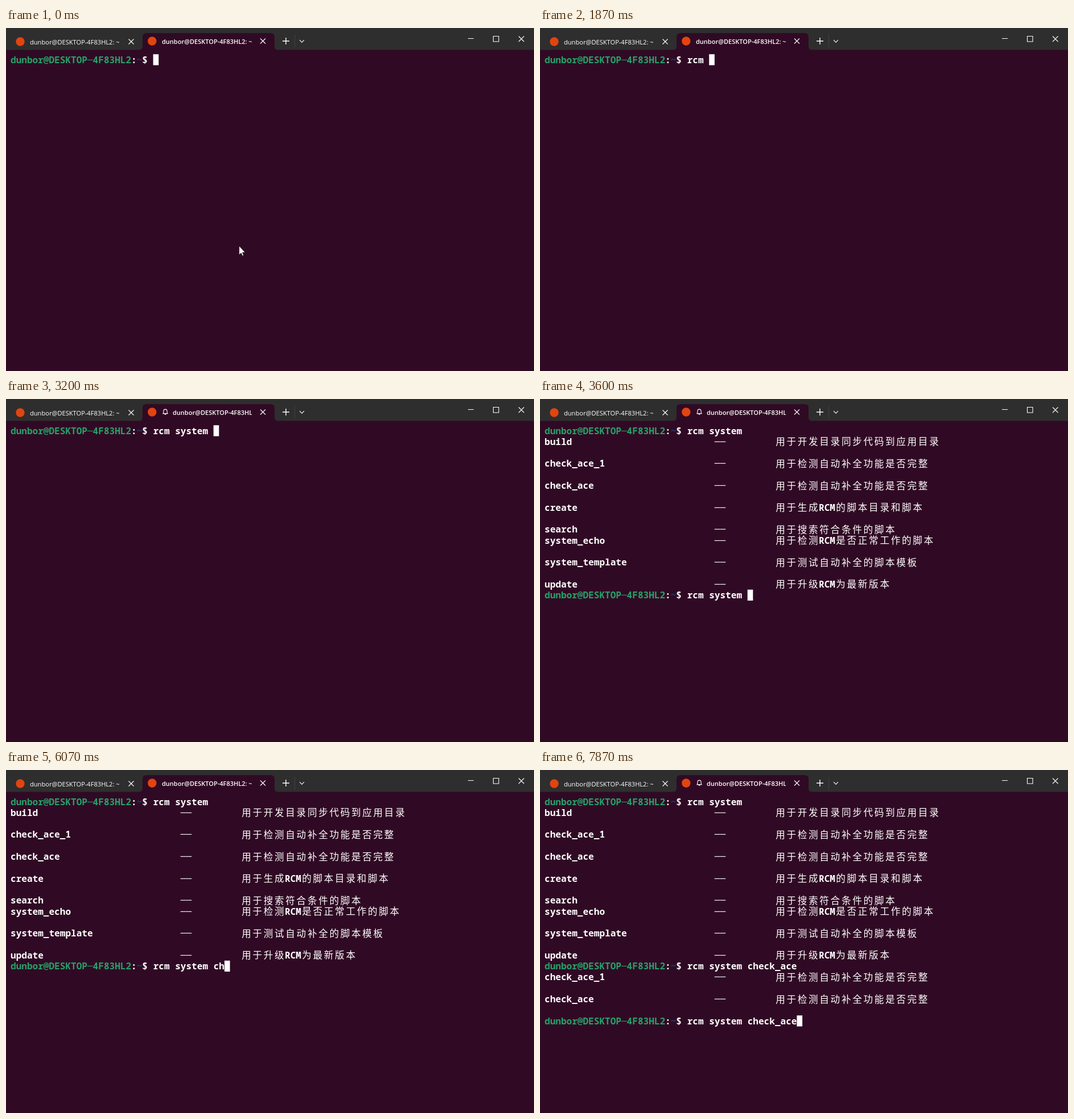
These frames come from a looping animation (928x604 px, 8 s). An HTML page:

```html
<!DOCTYPE html>
<html lang="zh-CN">
<head>
<meta charset="utf-8">
<title>Terminal completion</title>
<style>
  html, body { margin: 0; width: 100%; height: 100%; overflow: hidden; background: #300a24; }
  svg { display: block; }
  .mono { font: 600 16.07px "Noto Sans Mono", monospace; text-anchor: middle; }
  .cjk { font: 400 16.6px "Noto Sans CJK SC", "Noto Sans CJK", sans-serif; text-anchor: middle; }
  .tab { font: 500 11.1px "Open Sans", sans-serif; fill: #fff; }
  .active { font-weight: 600; font-size: 11px; }
  .icon { fill: none; stroke: #fff; stroke-width: 1.1; }
</style>
</head>
<body>
<svg width="928" height="604" viewBox="0 0 928 604">
  <defs><clipPath id="titleClip"><rect x="270" y="9" width="162" height="29"/></clipPath></defs>
  <rect width="928" height="604" fill="#300a24"/>
  <rect width="928" height="38.5" fill="#2e2e2e"/>
  <path d="M233 39q7 0 7-7V16q0-7 7-7H465q7 0 7 7V32q0 7 7 7Z" fill="#300a24"/>
  <circle cx="25" cy="24" r="7.7" fill="#e2440f"/>
  <circle cx="256.8" cy="23" r="7.7" fill="#e2440f"/>
  <text class="tab title" x="42" y="28.6"></text>
  <g clip-path="url(#titleClip)"><text id="activeTitle" class="tab active title" y="27.6"></text></g>
  <path id="bell" class="icon" d="M276 25.6H284L283.1 23.6V21.4A3.1 3.3 0 0 0 276.9 21.4V23.6ZM278.7 26Q280 29 281.3 26"/>
  <path d="M507.5 12V35" stroke="#404040"/>
  <g class="icon">
    <path d="M215.5 19.5l9 9m0-9l-9 9M447 18.5l9 9m0-9l-9 9"/>
    <path d="M486 23H498M492 17V29" stroke-width="1.4"/>
    <path d="M516 21.2l4 4 4-4"/>
    <path d="M812 18.5H822M856.5 14.5h9.5v9.5h-9.5ZM901 14.5l9.5 9.5m0-9.5l-9.5 9.5"/>
  </g>
  <g id="screen"></g>
  <rect id="caret" fill="#fff"/>
  <path id="pointer" d="M409.7 383.8V399.5L413.2 396.2L415.4 401.2L417.7 400.2L415.5 395.3H420.4Z" fill="#fff" stroke="#000" stroke-width=".7"/>
</svg>
<script>
const LOOP = 8000, CELL = 9.64, ROW = 19.3, LEFT = 8, TOP = 46.2;
const USER = "dunbor@DESKTOP-4F83HL2";
const PROMPT = USER.length + 4;
const CHECK = "用于检测自动补全功能是否完整";

// [row, name, description]
const LIST = [
  [1, "build", "用于开发目录同步代码到应用目录"],
  [3, "check_ace_1", CHECK],
  [5, "check_ace", CHECK],
  [7, "create", "用于生成RCM的脚本目录和脚本"],
  [9, "search", "用于搜索符合条件的脚本"],
  [10, "system_echo", "用于检测RCM是否正常工作的脚本"],
  [12, "system_template", "用于测试自动补全的脚本模板"],
  [14, "update", "用于升级RCM为最新版本"]
];
const MATCHES = [[16, "check_ace_1", CHECK], [18, "check_ace", CHECK]];

// [time, command typed so far]
const TYPED = [
  [0, ""], [1270, "r"], [1600, "rc"], [1730, "rcm"], [1870, "rcm "],
  [2330, "rcm s"], [2530, "rcm sy"], [2600, "rcm sys"], [2930, "rcm system "],
  [5930, "rcm system c"], [6070, "rcm system ch"], [6130, "rcm system che"],
  [6330, "rcm system check_ace"]
];
const FIRST_LIST = 3600, SECOND_LIST = 7870;
const BELLS = [[3200, 5270], [6400, LOOP]];

const $ = id => document.getElementById(id);
const colX = col => LEFT + col * CELL;
const rowY = row => TOP + row * ROW;
const isWide = ch => ch > "\u2fff";

// Places text on the character grid; wide characters take two cells.
function print(row, col, text, fill = "#fff") {
  const runs = {
    mono: { xs: [], chars: "", base: 15.3 },
    cjk: { xs: [], chars: "", base: 15.9 }
  };
  for (const ch of text) {
    const span = isWide(ch) ? 2 : 1;
    if (ch !== " ") {
      const run = span === 2 ? runs.cjk : runs.mono;
      run.xs.push(colX(col + span / 2).toFixed(2));
      run.chars += ch === "-" ? "─" : ch;
    }
    col += span;
  }
  return Object.entries(runs).filter(([, run]) => run.chars).map(([name, { xs, chars, base }]) =>
    `<text class="${name}" x="${xs.join(" ")}" y="${(rowY(row) + base).toFixed(1)}" fill="${fill}">${chars}</text>`
  ).join("");
}

const promptLine = (row, command) =>
  print(row, 0, USER, "#26a269") + print(row, USER.length, ":") +
  print(row, USER.length + 1, "~", "#12488b") + print(row, USER.length + 2, "$ " + command);

const listing = entries => entries.map(([row, name, about]) =>
  print(row, 0, name) + print(row, 31, "--") + print(row, 42, about)).join("");

let shown = "";

function render(t) {
  const command = TYPED.filter(([at]) => t >= at).pop()[1];
  const lists = (t >= FIRST_LIST) + (t >= SECOND_LIST);
  const row = [0, 15, 20][lists];
  const key = lists + command;

  if (key !== shown) {
    shown = key;
    let html = promptLine(row, command);
    if (lists > 0) html += promptLine(0, "rcm system ") + listing(LIST);
    if (lists > 1) html += promptLine(15, command) + listing(MATCHES);
    $("screen").innerHTML = html;
    $("caret").setAttribute("x", colX(PROMPT + command.length));
    $("caret").setAttribute("y", rowY(row));
  }

  const ringing = BELLS.some(([from, to]) => t >= from && t < to);
  $("bell").style.display = ringing ? "" : "none";
  $("activeTitle").setAttribute("x", ringing ? 293 : 274);
  $("pointer").style.display = t < 1200 ? "" : "none";
}

document.querySelectorAll(".title").forEach(el => el.textContent = USER + ": ~");
$("caret").setAttribute("width", CELL);
$("caret").setAttribute("height", ROW);

const start = performance.now();
function tick() {
  render((performance.now() - start) % LOOP);
  requestAnimationFrame(tick);
}
tick();
</script>
</body>
</html>
```
